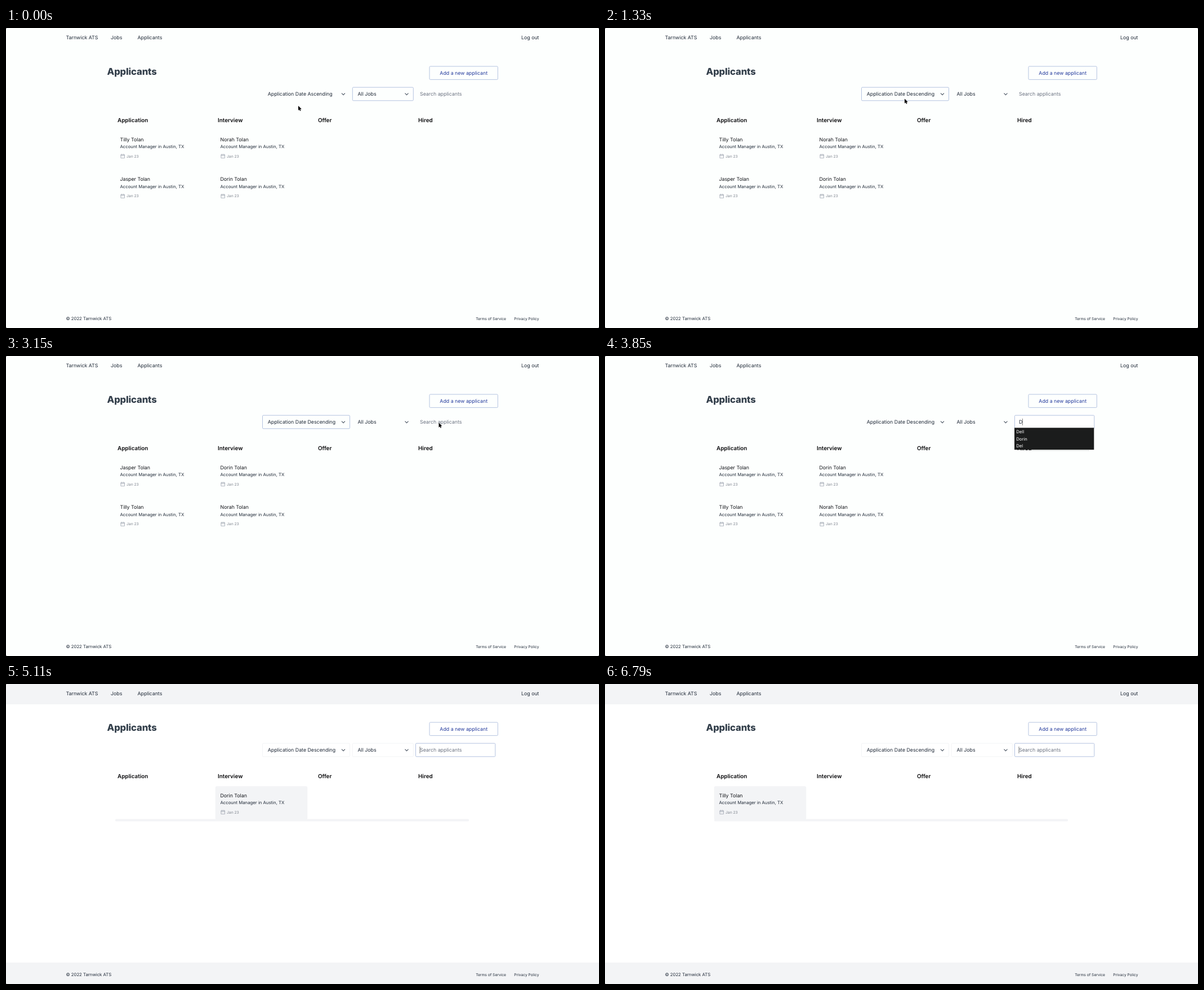
An HTML page that plays this animation: 1053 by 532 pixels, repeating every 6860 ms.

```html
<!DOCTYPE html>
<html lang="en">
<head>
<meta charset="utf-8">
<title>Applicants</title>
<style>
  html, body { margin: 0; width: 100%; height: 100%; overflow: hidden; background: #444; }
  svg { display: block; width: 100%; height: 100%; border-radius: 2px; }
  text { font-family: Inter, "Liberation Sans", sans-serif; text-rendering: geometricPrecision; }
</style>
</head>
<body>
<svg id="stage" viewBox="0 0 1053 532" xmlns="http://www.w3.org/2000/svg"></svg>
<script>
const LOOP = 6860, TICK = 70;
const BASE = 8.8, DETAIL = 7.76, SMALL = 6.7;
const INK = '#1f2937', PALE = '#f3f4f6', FOCUS = '#b4c3e0';
const TILLY = 'Tilly Tolan', JASPER = 'Jasper Tolan', NORAH = 'Norah Tolan', DORIN = 'Dorin Tolan';

// [time, x, y] of the pointer tip
const POINTER = [
  [0, 519, 138], [350, 526, 131], [560, 526, 131], [770, 532, 125.5], [1610, 532, 125.5],
  [2310, 544.5, 121.5], [2450, 544.5, 121.5], [3080, 765, 119], [3220, 772, 118]
];
// [time, content] of the search field
const TYPED = [
  [0, ''], [3850, 'D'], [3990, 'Do'], [4060, 'Dor'], [4130, 'Dori'], [4200, 'Dorin'],
  [4970, 'Dor'], [5040, 'D'], [5110, ''],
  [5530, 'T'], [5670, 'Ti'], [5810, 'Til'], [5880, 'Till'], [6020, 'Tilly'],
  [6580, 'Till'], [6650, 'Ti'], [6720, 'T'], [6790, '']
];

const stage = document.getElementById('stage');
const within = (t, from, to) => t >= from && t < to;

const text = (x, y, str, size = BASE, fill = INK, attrs = '') =>
  `<text x="${x}" y="${y}" font-size="${size}" fill="${fill}" ${attrs}>${str}</text>`;
const rect = (x, y, w, h, fill, attrs = '') =>
  `<rect x="${x}" y="${y}" width="${w}" height="${h}" fill="${fill}" ${attrs}/>`;
const frame = (x, y, w, h, stroke, fill = 'none') =>
  rect(x, y, w, h, fill, `rx="1.5" stroke="${stroke}"`);
const line = (d, stroke, width) =>
  `<path d="${d}" fill="none" stroke="${stroke}" stroke-width="${width}"/>`;
const chevron = x => line(`M${x - 3} 115.6l3 3 3-3`, '#4b5563', 1.1);

function pointerAt(t) {
  let i = 1;
  while (i < POINTER.length - 1 && POINTER[i][0] < t) i++;
  const [t0, x0, y0] = POINTER[i - 1], [t1, x1, y1] = POINTER[i];
  const k = Math.min(1, (t - t0) / (t1 - t0));
  return [x0 + (x1 - x0) * k, y0 + (y1 - y0) * k];
}

function pointer(t) {
  const [x, y] = pointerAt(t);
  return `<path transform="translate(${x} ${y})" d="M0 0V8.2L1.9 6.5 3.1 9.2 4.5 8.6 3.3 6 5.8 5.8Z"
    fill="#000" stroke="#fff" stroke-width=".8" paint-order="stroke"/>`;
}

function page(rich) {
  const bands = rich ? rect(0, 0, 1053, 36, PALE) + rect(0, 494, 1053, 38, PALE) : '';
  const titles = ['Application', 'Interview', 'Offer', 'Hired'].map((title, i) =>
    text(198 + 178 * i, 166.7, title, 9.9, '#0b0b0d', 'font-weight="600"'));
  return rect(0, 0, 1053, 532, rich ? '#fff' : '#fdfffe') + bands +
    text(106.5, 19.8, 'Tarnwick ATS') + text(186, 19.8, 'Jobs') + text(233.5, 19.8, 'Applicants') +
    text(946.5, 19.8, 'Log out', BASE, INK, 'text-anchor="end"') +
    text(179.5, 83.2, 'Applicants', 16.63, '#333f4b', 'font-weight="800" letter-spacing="-.15"') +
    frame(752, 68, 121.3, 23.4, FOCUS) +
    text(812.7, 83.2, 'Add a new applicant', BASE, '#233a9c', 'text-anchor="middle"') +
    titles.join('') +
    text(106.5, 517.8, '© 2022 Tarnwick ATS', DETAIL) +
    text(888, 517.5, 'Terms of Service', SMALL, INK, 'text-anchor="end"') +
    text(946.5, 517.5, 'Privacy Policy', SMALL, INK, 'text-anchor="end"');
}

function card(name, col, row, rich) {
  const x = 202.5 + 178 * col, y = 70.8 * row;
  const icon = `<g transform="translate(${x + 1} ${y + 223.2})">` +
    line('M.4 1.4h6.6v6H.4zM.4 3.2h6.6M2.1 0v1.8M5.3 0v1.8', '#9ca3af', .8) + '</g>';
  return (rich ? rect(x - 8.8, 181.3 + y, 163.6, 59.5, PALE, 'rx="3"') : '') +
    text(x, 200.6 + y, name, BASE, '#111318') +
    text(x, 212.8 + y, 'Account Manager in Austin, TX', DETAIL) + icon +
    text(x + 11.5, 229.5 + y, 'Jan 23', SMALL, '#8f949d', 'font-weight="500"');
}

function board(t, rich) {
  let columns = t < 1610 ? [[TILLY, JASPER], [NORAH, DORIN]] : [[JASPER, TILLY], [DORIN, NORAH]];
  if (within(t, 4480, 5320)) columns = [[], [DORIN]];
  if (t >= 6160) columns = [[TILLY], []];
  const rows = Math.max(...columns.map(c => c.length));
  const bar = rich ? rect(194, 168.8 + 70.8 * rows, 628, 4, PALE, 'rx="1.5"') : '';
  return bar + columns.map((names, col) =>
    names.map((name, row) => card(name, col, row, rich)).join('')).join('');
}

function selects(t, rich) {
  const order = t < 1330 ? 'Ascending' : 'Descending';
  const sortEdge = within(t, 980, 3570) ? FOCUS : rich ? PALE : 'none';
  const jobsEdge = t < 980 ? FOCUS : rich ? PALE : 'none';
  return frame(455.5, 105.2, 155, 23.6, sortEdge) + text(464.7, 120.3, 'Application Date ' + order) + chevron(599) +
    frame(615.3, 105.2, 108, 23.6, jobsEdge) + text(624.5, 120.3, 'All Jobs') + chevron(711.5);
}

function menu() {
  return rect(456, 106, 154, 32.5, '#000', 'opacity=".12"') +
    rect(454.5, 104.5, 155.7, 32.3, '#fff', 'stroke="#9a9da3" stroke-width=".9"') +
    rect(455, 121, 154.8, 13.4, '#0a57cd') +
    line('M459.6 114.6l2 2.4 3.6-5.6', '#222', 1.1) +
    text(468, 117.3, 'Application Date Ascending') +
    text(468, 131, 'Application Date Descending', BASE, '#fff');
}

function search(t) {
  const value = TYPED.filter(([from]) => from <= t).pop()[1];
  let out = t >= 3570 ? frame(727.5, 105.2, 141.3, 23.6, FOCUS, '#fff') : '';
  out += value ? text(735, 120.3, value, BASE, INK, 'id="value"')
               : text(735, 120.3, 'Search applicants', BASE, '#6b7280');
  const blink = within(t, 4760, 4970) || within(t, 5390, 5530) || t >= 6020 && t < 6580;
  if (t >= 3570 && !blink) out += '<path id="caret" d="M0 111v12" stroke="#444" stroke-width=".7"/>';

  let hints = [];
  if (within(t, 3850, 4480)) hints = value === 'D' ? ['Dell', 'Dorin', 'Del'] : ['Dorin'];
  if (within(t, 5530, 6580)) hints = ['Tilly'];
  if (hints.length) {
    const h = 1.1 + 12.6 * hints.length;
    out += rect(738, 128 + h, 122, 1.4, '#000', 'opacity=".1"') +
      rect(727, 127.3, 141.3, h, '#1b1c1c') +
      hints.map((hint, i) => text(730.3, 137.1 + 12.6 * i, hint, 7.7, '#fff')).join('');
  }
  return out;
}

function draw(t) {
  const rich = within(t, 4480, 5530) || t >= 6160;
  stage.innerHTML = page(rich) + board(t, rich) + selects(t, rich) + search(t) +
    (within(t, 980, 1330) ? menu() : '') + (t < 3850 ? pointer(t) : '');
  const caret = document.getElementById('caret'), value = document.getElementById('value');
  if (caret) caret.setAttribute('transform', `translate(${735 + (value ? value.getComputedTextLength() : 0)})`);
}

let last = -1;
function loop(now) {
  const t = Math.floor(now % LOOP / TICK) * TICK;
  if (t !== last) draw(last = t);
  requestAnimationFrame(loop);
}
draw(0);
requestAnimationFrame(loop);
</script>
</body>
</html>
```
